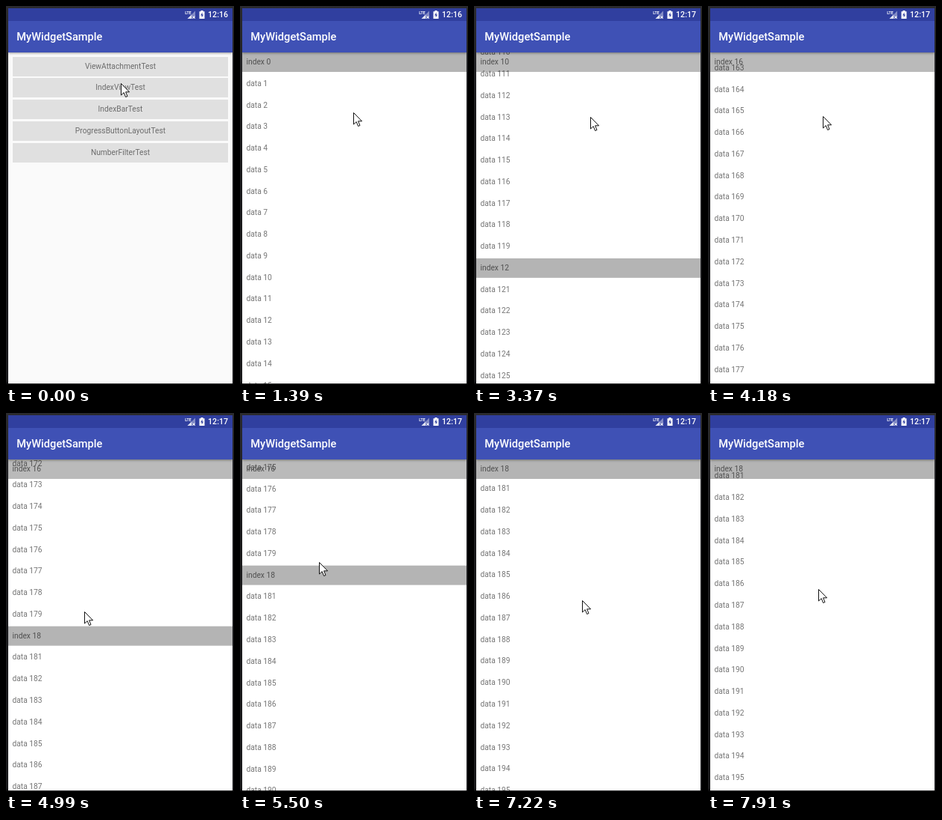
An HTML page that plays this animation: 306x506 px, repeating every 8 s.

```html
<!DOCTYPE html>
<html lang="en">
<head>
<meta charset="utf-8">
<title>Sticky index list</title>
<style>
html, body { margin: 0; width: 100%; height: 100%; overflow: hidden; background: #1b1b1d; }
#stage { position: relative; width: 306px; height: 506px; overflow: hidden; background: linear-gradient(#2b2b2e, #1b1b1d 30%, #1b1b1d 99%, #000);
  font: 10.25px/26px Roboto, "Open Sans", sans-serif; color: #757575; white-space: nowrap; }
#screen { position: absolute; left: 3px; top: 3px; width: 301px; height: 500.5px; overflow: hidden; background: #fafafa; }
.win { position: absolute; inset: 0; background: #fafafa; }
.bar { position: absolute; left: 0; top: 0; width: 301px; height: 58.5px; box-sizing: border-box; padding: 17px 0 0 11.3px;
  background: linear-gradient(#303f9f 17px, #3f51b5 17px); color: #fff; font-size: 14.64px; font-weight: 500; line-height: 43px;
  box-shadow: 0 1px 3px rgba(0, 0, 0, .4); }
.btn { position: absolute; left: 6px; width: 289px; height: 26px; background: #e0e0e0; text-align: center; color: #6c6c6c; overflow: hidden; }
#ripple { position: absolute; left: 139px; top: 14px; border-radius: 50%; background: rgba(0, 0, 0, .08); transform: translate(-50%, -50%); }
#list { position: absolute; left: 0; top: 58.7px; width: 301px; height: 442px; overflow: hidden; background: #fff; }
.row { position: absolute; left: 0; top: 0; width: 301px; height: 26px; box-sizing: border-box; padding-left: 5.5px; }
.head { background: rgba(0, 0, 0, .295); color: #505050; }
#clock { position: absolute; right: 8px; top: 3px; line-height: 18px; font-size: 10.6px; font-weight: 500; color: #fff; }
svg { position: absolute; left: 0; top: 0; overflow: visible; }
</style>
</head>
<body>
<div id="stage">
  <div id="screen">
    <div class="win" id="menu"><div class="bar">MyWidgetSample</div></div>
    <div class="win" id="page">
      <div id="list"></div>
      <div class="bar">MyWidgetSample</div>
    </div>
  </div>
  <svg width="306" height="22">
    <text x="240.3" y="10.8" font-size="5.2" font-weight="700" fill="#fff" font-family="Roboto, sans-serif" textLength="none">LTE</text>
    <path d="M243.5 17L254 6.5V17Z" fill="#fff" opacity=".4"/>
    <path d="M243.5 17L249 11.5V17Z" fill="#fff" opacity=".75"/>
    <path d="M250.5 13.5l3 3m0-3l-3 3" stroke="#fff"/>
    <path d="M259.5 7.2h2V6h3v1.2h2V17h-7z" fill="#fff"/>
    <path d="M263.5 8.5l-2.4 4h1.6v3l2.3-4h-1.5z" fill="#303f9f"/>
  </svg>
  <div id="clock">12:16</div>
  <svg id="cursor" width="13" height="20">
    <path d="M.5 .5V16L4.2 12.6 6.6 18.5 9 17.5 6.6 11.8H11.6Z" fill="#fff" stroke="#111"/>
  </svg>
</div>
<script>
const LOOP = 8000, PITCH = 28.77;
const $ = id => document.getElementById(id);

// Screen updates come in bursts of 120 ms steps from these times.
const bursts = [0, 500, 650, 1390, 1540, 1810, 2200, 2470, 2740, 3010, 3640, 3790, 4180, 4330,
  4840, 4990, 5380, 5770, 6160, 6310, 6590, 7220, 7490, 7640, 7790, LOOP];

// time, scroll, pointer x, pointer y
const keys = [
  [1250, 0, 154, 103], [1390, 0, 152, 142], [1540, 0, 136, 270], [1660, 0, 119, 383],
  [1810, 0, 124, 383], [2050, 8.5, 132, 374], [2200, 60, 138, 322], [2320, 150, 146, 232],
  [2470, 225, 154, 160], [2590, 330, 157, 148], [2740, 859, 157, 148], [4180, 4680, 154, 147],
  [4690, 4920, 118, 285], [4840, 4925, 105, 296], [4990, 4955.9, 105, 265], [6010, 5118, 106, 132],
  [6160, 5118, 129, 305], [6310, 5118, 129, 318], [6430, 5118, 129, 318], [6590, 5128.4, 132, 303],
  [7070, 5170, 143, 261], [7340, 5190, 146, 241], [7640, 5202, 148, 229], [7790, 5198, 148, 235],
  [7910, 5189, 149, 253]
];

function add(parent, cls, text = '') {
  const el = document.createElement('div');
  el.className = cls;
  el.textContent = text;
  return parent.appendChild(el);
}

['ViewAttachment', 'IndexView', 'IndexBar', 'ProgressButtonLayout', 'NumberFilter'].forEach((name, i) => {
  const btn = add($('menu'), 'btn', name + 'Test');
  btn.style.top = 64.5 + i * 28.75 + 'px';
  if (i === 1) add(btn, '').id = 'ripple';
});
const rows = Array.from({ length: 17 }, () => add($('list'), 'row'));
const sticky = add($('list'), 'row head');

function snap(t) {
  const i = bursts.findIndex(b => b > t) - 1, start = bursts[i];
  const last = Math.max(0, Math.floor((bursts[i + 1] - start) / 120) - 1);
  return start + 120 * Math.min(last, Math.floor((t - start) / 120));
}

function sample(t) {
  const i = keys.findIndex(k => k[0] > t);
  if (i === 0) return keys[0];
  if (i < 0) return keys[keys.length - 1];
  const a = keys[i - 1], b = keys[i], u = (t - a[0]) / (b[0] - a[0]);
  return a.map((v, j) => v + (b[j] - v) * u);
}

// Free scrolling slows down after the flick.
const fling = t => 859 + 4061 * (1 - Math.pow(Math.max(0, 1 - (t - 2740) / 2010), 2.25));

const label = n => n % 20 ? 'data ' + n : 'index ' + n / 10;

function setText(el, text) {
  if (el.textContent !== text) el.textContent = text;
}

function drawList(scroll) {
  const first = Math.floor(scroll / PITCH);
  rows.forEach((row, i) => {
    const n = first + i, head = n % 20 === 0;
    setText(row, label(n));
    row.className = head ? 'row head' : 'row';
    row.style.visibility = head && !i ? 'hidden' : 'visible';
    row.style.transform = `translateY(${(n * PITCH - scroll).toFixed(2)}px)`;
  });
  setText(sticky, label(first - first % 20));
  sticky.style.backgroundColor = `rgba(0, 0, 0, ${first % 20 ? .27 : .295})`;
}

function draw(now) {
  const t = snap(now % LOOP);
  const [, pos, x, y] = sample(t);
  const enter = Math.min(1, Math.max(0, (t - 560) / 300));
  const page = $('page').style, ripple = $('ripple').style;
  page.opacity = enter;
  page.transform = enter < 1 ? `translateY(${40 * (1 - enter) ** 2}px)` : 'none';
  ripple.display = t >= 500 && t < 890 ? 'block' : 'none';
  ripple.width = t < 650 ? '29px' : '300px';
  ripple.height = t < 650 ? '7px' : '300px';
  drawList(t >= 2740 && t < 4750 ? fling(t) : pos);
  setText($('clock'), t < 1540 ? '12:16' : '12:17');
  $('cursor').style.transform = `translate(${Math.round(x)}px, ${Math.round(y)}px)`;
}

const begin = performance.now();
function tick() {
  draw(performance.now() - begin);
  requestAnimationFrame(tick);
}
tick();
</script>
</body>
</html>
```
